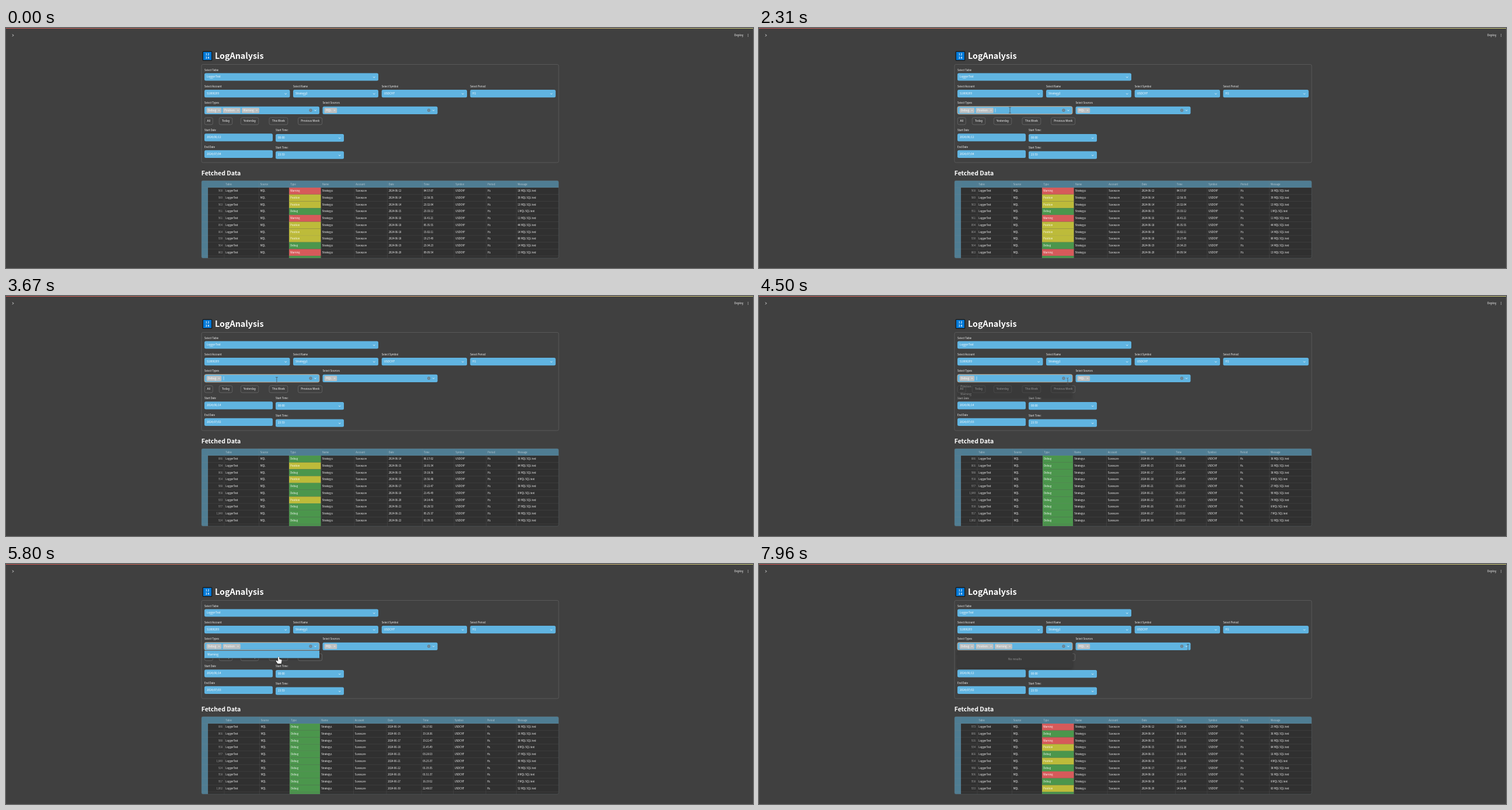
These frames come from a looping animation (1280 px wide and 412 px high, 8 s). An HTML page with a canvas:

```html
<!DOCTYPE html>
<html lang="en">
<head>
<meta charset="utf-8">
<title>LogAnalysis</title>
<style>
  html, body { margin: 0; width: 1280px; height: 412px; overflow: hidden; background: #404040; }
  canvas { display: block; }
</style>
</head>
<body>
<canvas id="stage" width="1280" height="412"></canvas>
<script>
const ctx = document.getElementById('stage').getContext('2d');
const LOOP = 8000;
const FONT = '"Noto Sans CJK JP", "Noto Sans CJK SC", "Noto Sans CJK", "Open Sans", sans-serif';
const BLUE = '#60b4e1', HEAD = '#4f7d93', PAGE = '#404040';
const TYPES = { W: ['Warning', '#d65a5a'], P: ['Position', '#bdbb3a'], D: ['Debug', '#4b964c'] };

// id, type, date, time, message number
const parse = text => text.trim().split('\n').map(line => line.trim().split(' '));
const strategy2 = parse(`
  968 W 06-12 04:57:07 18
  989 P 06-14 12:58:35 39
  963 P 06-14 23:32:04 13
  951 D 06-15 23:33:12 1
  961 W 06-16 16:41:21 11
  894 P 06-18 05:35:55 44
  864 P 06-18 15:02:11 14
  930 P 06-18 19:27:49 80
  964 D 06-19 23:34:23 14
  863 W 06-20 09:09:54 13
  952 D 06-21 02:10:31 2`);
const strategy1 = parse(`
  973 W 06-12 19:34:24 23
  886 D 06-14 06:17:02 36
  916 W 06-15 05:54:03 66
  934 P 06-15 16:01:34 84
  866 D 06-15 19:18:36 16
  954 P 06-16 19:56:48 4
  988 D 06-17 19:22:47 38
  906 W 06-18 14:15:33 56
  958 D 06-18 21:45:49 8
  933 P 06-20 14:14:46 83
  977 D 06-21 03:28:53 27
  1,040 D 06-21 05:25:37 90
  924 D 06-22 01:39:35 74
  958 D 06-26 01:51:37 8
  957 D 06-27 16:19:52 7
  1,002 D 06-30 22:48:57 52
  960 D 07-03 08:12:40 10`);

// Query results, in order of arrival
const results = [
  { at: 0, name: 'Strategy2', types: 'DPW', from: '06/12', to: '07/04' },
  { at: 2600, name: 'Strategy1', types: 'DP', from: '06/14', to: '07/02' },
  { at: 3720, name: 'Strategy1', types: 'D', from: '06/14', to: '07/03' },
  { at: 5820, name: 'Strategy1', types: 'DP', from: '06/14', to: '07/02' },
  { at: 7480, name: 'Strategy1', types: 'DPW', from: '06/12', to: '07/02' },
];
const selections = [[0, 'DPW'], [2160, 'DP'], [3260, 'D'], [5470, 'DP'], [7000, 'DPW']];
const clicks = [[2090, 2220], [3190, 3320], [4360, 4480], [5320, 5465], [6860, 6990]];
const carets = [[2160, 2650], [3300, 3800], [4400, 4950]];
const pointer = [
  [70, 1242, 402, 'arrow'], [560, 600, 172, 'arrow'], [700, 408, 126, 'arrow'], [830, 597, 160, 'arrow'],
  [890, 597, 160, 'arrow'], [1430, 429, 141, 'hand'], [1690, 429, 141, 'hand'], [1820, 429, 140, 'hand'],
  [2160, 430, 141, 'beam'], [2400, 430, 141, 'beam'], [2790, 397, 143, 'hand'], [2920, 397, 143, 'hand'],
  [2990, 398, 143, 'hand'], [3260, 398, 143, 'beam'], [3400, 398, 143, 'beam'], [3940, 529, 146, 'beam'],
  [4620, 529, 146, 'beam'], [4800, 500, 151, 'hand'], [5110, 428, 160, 'hand'], [5500, 428, 159, 'hand'],
  [5930, 478, 159, 'hand'], [6200, 470, 157, 'hand'], [7050, 470, 156, 'arrow'], [7610, 746, 131, 'arrow'],
  [7700, 742, 137, 'beam'], [7960, 735, 143, 'beam'],
];

const active = (ranges, t) => ranges.some(([a, b]) => t >= a && t < b);

function rect(x, y, w, h, r, fill, stroke, width = .6) {
  ctx.beginPath();
  ctx.roundRect(x, y, w, h, r);
  if (fill) { ctx.fillStyle = fill; ctx.fill(); }
  if (stroke) { ctx.strokeStyle = stroke; ctx.lineWidth = width; ctx.stroke(); }
}

function text(s, x, y, size = 4.3, color = '#fff', weight = 500, align = 'left') {
  ctx.font = `${weight} ${size}px ${FONT}`;
  ctx.textAlign = align;
  ctx.textBaseline = 'alphabetic';
  ctx.fillStyle = color;
  ctx.fillText(s, x, y + size * .36);
}

function line(points, color, width) {
  ctx.beginPath();
  points.forEach(([x, y]) => ctx.lineTo(x, y));
  ctx.strokeStyle = color;
  ctx.lineWidth = width;
  ctx.stroke();
}

function cross(x, y, r, color) {
  line([[x - r, y - r], [x + r, y + r]], color, .7);
  line([[x - r, y + r], [x + r, y - r]], color, .7);
}

const chevron = (x, y) => line([[x - 1.5, y - .8], [x, y + .8], [x + 1.5, y - .8]], '#fff', .8);

function field(label, value, x, y, w, arrow = true, labelY = y - 12) {
  text(label, x, labelY, 4.3);
  rect(x, y - 6.6, w, 13.2, 2.5, BLUE);
  text(value, x + 4, y - .3, 4.7);
  if (arrow) chevron(x + w - 7.3, y + .5);
}

function tag(label, x, w) {
  rect(x, 136.9, w, 9, 1.5, '#bcc0c2');
  text(label, x + 2.5, 141.3, 4.7);
  cross(x + w - 4.2, 141.4, 1, '#f4f4f4');
}

function multi(label, x, focused) {
  text(label, x, 128.8, 4.3);
  rect(x, 134.7, 197, 13.2, 2.5, BLUE, focused && '#d3aa86', .9);
  ctx.beginPath();
  ctx.arc(x + 182, 141.2, 2.6, 0, 7);
  ctx.fillStyle = '#6f7d86';
  ctx.fill();
  cross(x + 182, 141.2, .9, BLUE);
  chevron(x + 190, 141.4);
}

function button(label, x, w) {
  rect(x, 153.9, w, 12, 2.5, PAGE, '#777');
  text(label, x + w / 2, 159.7, 4.7, '#fff', 500, 'center');
}

function table({ name, types }) {
  const rows = (name === 'Strategy2' ? strategy2 : strategy1).filter(r => types.includes(r[1]));
  const left = types === 'D' ? 1 : 0, right = types === 'D' ? -1.5 : 0;
  const columns = [['Table', 374, 0], ['Source', 433.5, left], ['Type', 485, left], ['Name', 539.5, right],
    ['Account', 597, right], ['Date', 653.5, right], ['Time', 713.5, right], ['Symbol', 768, right],
    ['Period', 823, right / 2], ['Message', 874.5, 0]].map(([title, x, dx]) => [title, x + dx]);
  const step = 11.72, typeX = columns[2][1], nameX = columns[3][1];

  ctx.save();
  ctx.beginPath();
  ctx.roundRect(335, 262, 612, 133, 2.5);
  ctx.clip();
  ctx.fillStyle = '#303030';
  ctx.fillRect(335, 262, 612, 133);
  ctx.fillStyle = HEAD;
  ctx.fillRect(335, 262, 612, 12);
  ctx.fillRect(335, 262, 11, 133);
  rows.slice(0, 11).forEach(([id, type, date, time, message], i) => {
    const top = 274 + i * step, y = top + 5.8;
    const [label, color] = TYPES[type];
    ctx.fillStyle = color;
    ctx.fillRect(typeX, top, nameX - typeX, step);
    line([[335, top], [947, top]], 'rgba(140,140,140,.3)', .5);
    if (i > 9) return;
    text(id, 371, y, 4.2, '#aaa', 400, 'right');
    const cells = ['LoggerTest', 'MQL', label, name, 'S1808209', '2024-' + date, time, 'USDCHF', 'H1', message + ' MQL SQL test'];
    cells.forEach((cell, c) => text(cell, columns[c][1] + 2.3, y, 4.2));
  });
  line([[346, 262], [346, 395]], 'rgba(140,140,140,.3)', .5);
  for (const [title, x] of columns) {
    line([[x, 262], [x, 395]], 'rgba(140,140,140,.3)', .5);
    text(title, x + 2.3, 268, 4.2, '#b9c9d1', 400);
  }
  ctx.restore();
  rect(335, 262, 612, 133, 2.5, null, '#5b6267', .5);
}

function dropdown(t, selected, hoverY) {
  if (t < 4400) return;
  const options = ['P', 'W'].filter(k => !selected.includes(k));
  const height = options.length === 2 ? 27 : options.length ? 13 : 30;
  ctx.save();
  ctx.globalAlpha = Math.min(1, (t - 4400) / 240);
  ctx.shadowColor = 'rgba(0,0,0,.3)';
  ctx.shadowBlur = 4;
  ctx.shadowOffsetY = 1;
  rect(340, 148.6, 197, height, 1.5, '#3a3a3a');
  ctx.shadowColor = 'transparent';
  options.forEach((key, i) => {
    if (i === 0 && hoverY > 148) rect(340, 148.7, 197, 12.8, 0, BLUE);
    text(TYPES[key][0], 345.3, 154.8 + i * 13, 4.8);
  });
  if (!options.length) text('No results', 438.5, 162.8, 4.9, '#999', 400, 'center');
  ctx.restore();
}

function pointerAt(t) {
  const i = pointer.findLastIndex(k => k[0] <= t);
  if (i < 0) return null;
  const a = pointer[i], b = pointer[i + 1] || a;
  const p = a === b ? 0 : (t - a[0]) / (b[0] - a[0]);
  const e = p * p * (3 - 2 * p);
  return { x: a[1] + (b[1] - a[1]) * e, y: a[2] + (b[2] - a[2]) * e, kind: a[3] };
}

const shapes = {
  arrow: new Path2D('M0 0V10L2.4 7.8L4 11.4L5.6 10.7L4 7.2H7.2Z'),
  hand: new Path2D('M-1 1Q0-.6 1 1V4.4L4.6 5.2Q5.6 5.6 5.3 7L4.4 12H-1.6L-4.4 8Q-4.6 6.4-3.2 6.8L-1 8.2Z'),
  beam: new Path2D('M-2-5H2M0-5V5M-2 5H2'),
};

function drawPointer({ x, y, kind }, clicked) {
  ctx.save();
  ctx.translate(x, y);
  if (clicked) {
    ctx.beginPath();
    ctx.arc(0, 0, 6, 0, 7);
    ctx.fillStyle = 'rgba(205,212,62,.85)';
    ctx.fill();
  }
  ctx.lineWidth = .8;
  ctx.strokeStyle = kind === 'beam' ? '#46545c' : '#222';
  ctx.stroke(shapes[kind]);
  if (kind !== 'beam') { ctx.fillStyle = '#fff'; ctx.fill(shapes[kind]); }
  ctx.restore();
}

function draw(t) {
  const result = results.findLast(r => r.at <= t);
  const selected = selections.findLast(s => s[0] <= t)[1];
  const mouse = pointerAt(t);

  ctx.fillStyle = PAGE;
  ctx.fillRect(0, 0, 1280, 412);
  const strip = ctx.createLinearGradient(0, 0, 1280, 0);
  strip.addColorStop(0, '#cf5552');
  strip.addColorStop(1, '#cac878');
  ctx.fillStyle = strip;
  ctx.fillRect(0, 0, 1280, 1);

  line([[11, 10.8], [12.8, 12.6], [11, 14.4]], '#fff', .9);
  text('Deploy', 1248, 12.3, 4.7);
  for (const y of [10.8, 12.6, 14.4]) rect(1271.1, y - .5, 1, 1, .5, '#fff');

  rect(337.3, 40.3, 15.4, 15.4, 1, '#0078d7', '#171717', 1.2);
  text('1 2', 345, 45.4, 4.8, '#fff', 700, 'center');
  text('3 4', 345, 51.2, 4.8, '#fff', 700, 'center');
  text('LogAnalysis', 358, 48.2, 14.3, '#fff', 700);

  rect(335, 62.5, 612, 168.5, 2.5, null, '#6a6a6a');
  field('Select Table', 'LoggerTest', 340, 84, 298);
  field('Select Account', 'S1808209', 340, 112.6, 146.5);
  field('Select Name', result.name, 492, 112.6, 146);
  field('Select Symbol', 'USDCHF', 643.7, 112.6, 146.3);
  field('Select Period', 'H1', 795.3, 112.6, 146.5);

  multi('Select Types', 340, t >= 2090);
  const tags = { D: [343.5, 25.7], P: [371.5, 30.3], W: [404, 30] };
  for (const key of selected) tag(TYPES[key][0], ...tags[key]);
  multi('Select Sources', 542.5, false);
  tag('MQL', 545.5, 21.7);
  if (active(carets, t)) {
    const x = selected === 'D' ? 373 : 405;
    line([[x, 138], [x, 144.5]], '#e8f4fb', .6);
  }

  button('All', 340.3, 14);
  button('Today', 365.3, 22.5);
  button('Yesterday', 402.3, 30.5);
  button('This Week', 451, 31.8);
  button('Previous Week', 500.5, 41.2);

  field('Start Date', '2024/' + result.from, 340, 187.8, 117, false, 175.5);
  field('Start Time:', '00:00', 462, 188.6, 117, true, 175.5);
  field('End Date', '2024/' + result.to, 340, 216.4, 117, false, 204.2);
  field('Start Time:', '23:59', 462, 218.1, 117, true, 205.2);

  text('Fetched Data', 334.7, 249, 10.5, '#fff', 700);
  table(result);
  dropdown(t, selected, mouse ? mouse.y : 0);
  if (mouse) drawPointer(mouse, active(clicks, t));
}

const start = performance.now();
function tick() {
  draw((performance.now() - start) % LOOP);
  requestAnimationFrame(tick);
}
tick();
</script>
</body>
</html>
```
